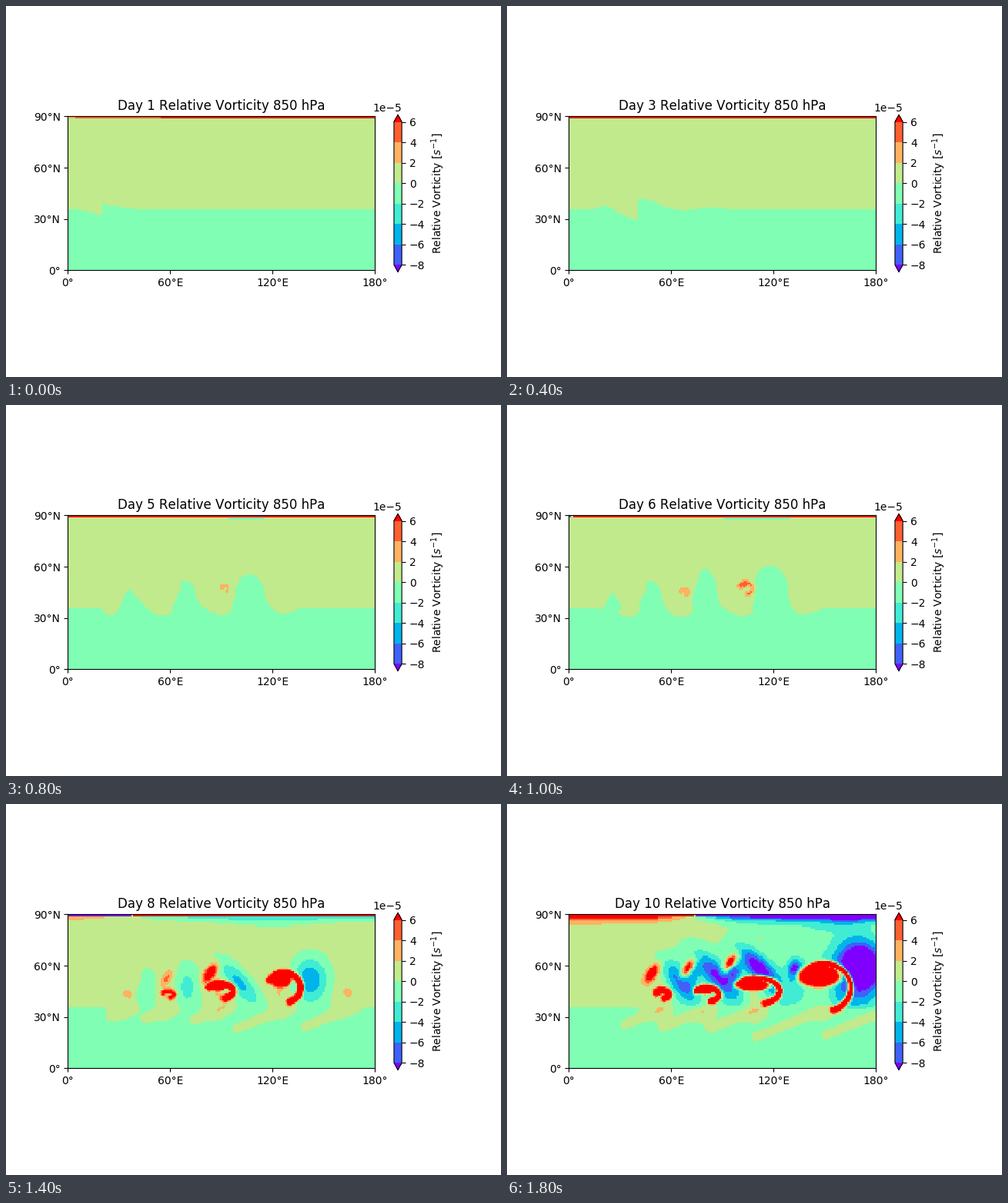
These frames come from a looping animation (643 by 482 pixels, 2000 ms). A matplotlib script:

```python
import numpy as np
import matplotlib.pyplot as plt
from matplotlib.animation import FuncAnimation
from matplotlib.colors import from_levels_and_colors

plt.rcParams["text.kerning_factor"] = 6
DAYS = 10
lon, lat = np.meshgrid(np.arange(181.0), np.arange(91.0))

# longitude on day 8, degrees per day, lead in days, latitude, size, roundness,
# strongest high, length of the trailing front
STORMS = [
    (164, 12.0, -2.3, 44, 0.70, 0.80, 0, 25),
    (127, 11.5, 0.4, 47, 1.05, 1.00, 13, 28),
    (89.5, 10.6, 0.0, 45, 0.95, 0.65, 9, 15),
    (59, 11.0, -1.0, 43, 0.65, 0.65, 7, 13),
    (35.5, 9.7, -2.0, 43, 0.50, 0.65, 6, 10),
]


def ramp(x):
    return np.clip(x, 0, 1)


def step(x):
    return 0.5 + 0.5 * np.tanh(x / 2)


def bump(x, y, sx, sy, lean=0, power=1):
    """Elliptic bump; lean shifts it east per degree of latitude."""
    u, v = lon - x, lat - y
    return np.exp(-(((u - lean * v) / sx) ** 2 + (v / sy) ** 2) ** power)


def ridge(xs, ys, width):
    d2 = (lon[..., None] - xs) ** 2 + (lat[..., None] - ys) ** 2
    return np.exp(-d2.min(axis=-1) / width**2)


belt = step((lat - 35) / 1.2)   # highs end at the subtropical edge
east = step((lon - 20) / 1.5)   # nothing grows west of the first disturbance


def background(t):
    """Zonal shear with the first sharp kink and the growing polar lens."""
    s = lon - 10 - 10 * t
    kink = np.where(s > 0, np.exp(-(s / 14) ** 2), -1.1 * np.exp(-(s / 9) ** 2))
    shore = 35.5 + (2.7 + 1.35 * (t - 1)) * kink * ramp(5 - t)
    shore += 0.9 * (t - 1) * np.exp(-((s + 19) / 5) ** 2) * ramp(5 - t)
    depth = min(0.44 * t, 2.2) + 0.5 * max(t - 5, 0) ** 2
    edge = 90 - depth * np.exp(-((lon - 80 - 5 * t) / 35) ** 2)
    shear = np.tanh((lat - shore) / 8)
    shear = np.where(shear < 0, 0.5 * shear, 0.9 * shear)
    z = np.minimum(shear, np.where(lat > 70, 0.9 * np.tanh((edge - lat) / 3), 1))
    late = max(t - 8, 0)
    z -= 1.5 * late * belt * np.exp(-((lat - 50) / 20) ** 2) * step((lon - 58) / 3)
    z -= 1.3 * late * belt * np.exp(-((lon - 65 - 10 * t) / 18) ** 2)
    return z


def storm(t, x8, speed, lead, y, size, roundness, cap, reach):
    x, age = x8 + speed * (t - 8), t - 8 + lead
    grown = max(age, 0)
    rx = max(8 + 2.8 * age, 2) * size
    ry = 0.9 * rx * roundness
    leader = roundness == 1

    # high ahead of the low, leaning back to the north-west in the followers
    strength = min(5.5 * np.exp(0.45 * age), cap)
    dx = 14 + 3 * grown if leader else 11 - 5 * grown
    lean = 0 if leader else -0.7 * ramp(age + 1)
    z = 1.4 * np.exp(0.3 * age) * bump(x - 2, y - 3, 7, 12)
    z -= strength * belt * bump(x + dx, 50 + max(2 * age, 4 * age),
                                10 + 0.7 * grown if leader else 7.5, 13, lean)
    z -= 9 * roundness * ramp(age - 0.4) * bump(x - 1.1 * rx, 57, 4, 6)

    # trailing front
    back = reach + 6 * (t - 8)
    k = np.linspace(0, 1, 30)
    z += 1.3 * ramp(t - 6) * ridge(x + 4 - k * (back + 4), 36 - k * (2 + 0.4 * back), 2.6)

    # core, the hook around it and the spur it sheds
    peak = min(22 * np.exp(1.1 * age), 25)
    a = np.radians(np.linspace(150, -70, 50))
    hook = ridge(x + rx * np.cos(a), y + ry * np.sin(a), 1.6)
    core = bump(x - 0.2 * rx, y + 0.5 * ry, (0.5 + 0.13 * age) * rx, 0.42 * ry, power=2)
    spur = 0.5 * bump(x - 6 - 5 * age, 55.5 + 3 * age, 3.2, 5, lean=0.5)
    low = np.maximum(hook, core)
    if roundness < 0.7:
        low = np.maximum(low, spur)
    return east * ramp((t - 2.5) / 2) * (z + peak * low)


def add_pole(z, t):
    """Dipole at the pole, turning east, with alternating rows below it."""
    front = 20 + 18 * (t - 7)
    if t > 7:
        z -= 8 * (t - 7) * np.exp((lat - 90) / 2) * np.tanh((lon - front) / 30)
    pole = (3.8 + 0.04 * lon[0]) * t * np.tanh((lon[0] - front) / 3)
    z[90] = pole
    z[89] = pole * np.clip(17 - 2 * t, -1, 1)


def vorticity(t):
    z = background(t) + sum(storm(t, *row) for row in STORMS)
    add_pole(z, t)
    return z * 1e-5


fields = [vorticity(day) for day in range(1, DAYS + 1)]

fig, ax = plt.subplots(figsize=(6.43, 4.82), dpi=100)
cmap, norm = from_levels_and_colors(np.arange(-8, 7, 2) * 1e-5,
                                    plt.cm.rainbow(np.linspace(0, 1, 9)), extend="both")
image = ax.imshow(fields[0], cmap=cmap, norm=norm, origin="lower", aspect=1.003,
                  extent=(-0.5, 180.5, -0.5, 90.5), interpolation="nearest")
ax.set(xlim=(0, 180), ylim=(0, 90))
ax.set_xticks([0, 60, 120, 180], ["0°", "60°E", "120°E", "180°"])
ax.set_yticks([0, 30, 60, 90], ["0°", "30°N", "60°N", "90°N"])
bar = fig.colorbar(image, ax=ax, shrink=0.55)
bar.set_label("Relative Vorticity [$s^{-1}$]")


def draw(i):
    image.set_data(fields[i])
    ax.set_title(f"Day {i + 1} Relative Vorticity 850 hPa")
    return [image]


anim = FuncAnimation(fig, draw, frames=DAYS, interval=200, repeat=True)
plt.show()
```
